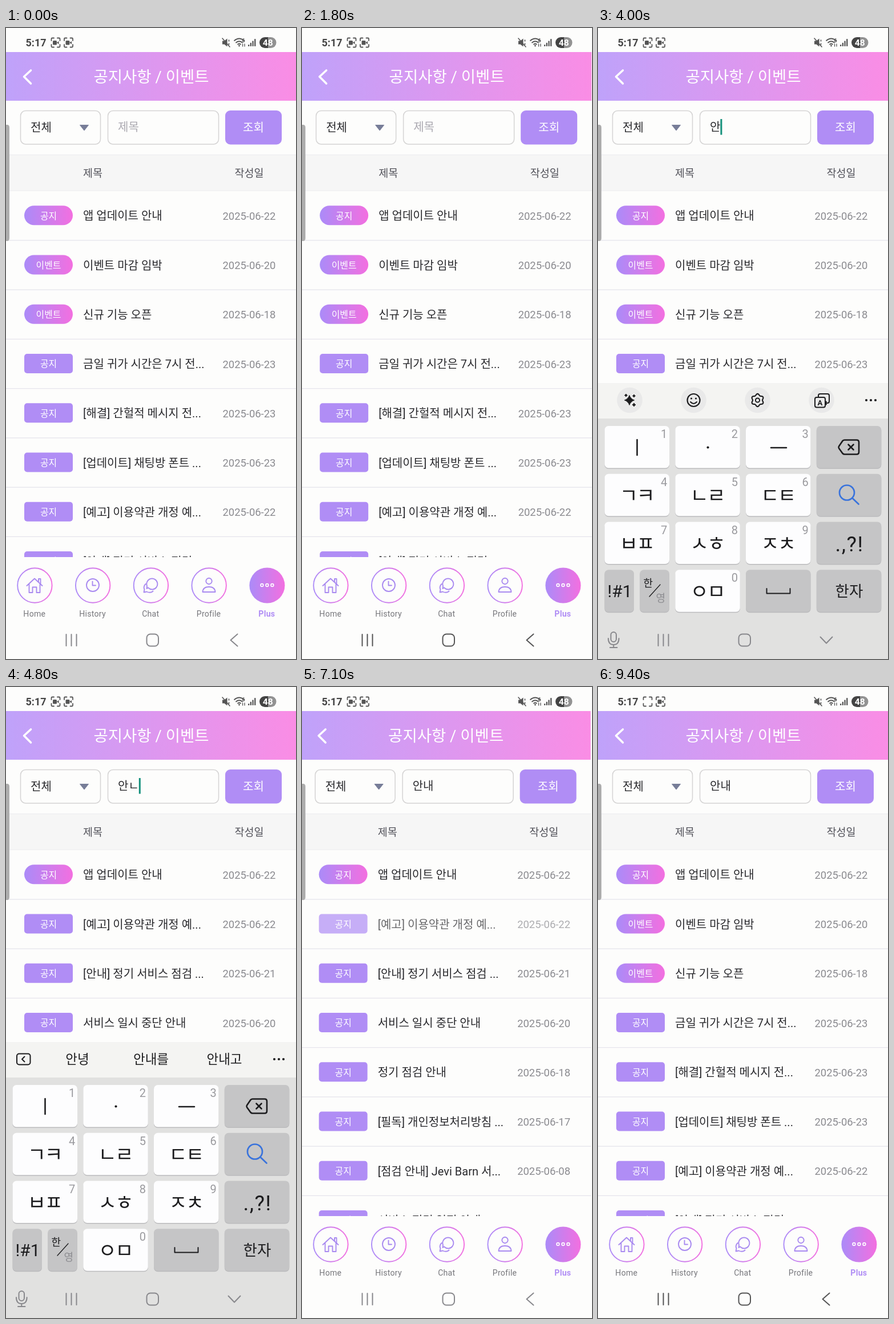
Recreate the animation shown at these times as an HTML page. Size 508 by 1102 pixels, loop 9500 ms.

```html
<!DOCTYPE html>
<html lang="ko">
<head>
<meta charset="utf-8">
<style>
html, body { margin: 0; width: 100%; height: 100%; overflow: hidden; background: #fdfdfc; }
svg { display: block; width: 508px; height: 1102px; }
text { font-family: Roboto, "Noto Sans CJK KR", "Noto Sans CJK JP", sans-serif; white-space: pre; }
.line { fill: none; stroke-linecap: round; stroke-linejoin: round; }
</style>
</head>
<body>
<svg id="stage" viewBox="0 0 508 1102" xmlns="http://www.w3.org/2000/svg"></svg>
<script>
const LOOP = 9500;
const PURPLE = '#b08df5', INK = '#28282c', PAPER = '#fdfdfc';
const KEY_INK = '#1c1c1e', WHITE_KEY = '#fdfdfe', GRAY_KEY = '#c5c5c6';

const text = (x, y, s, size, fill, extra = '') =>
  `<text x="${x}" y="${y}" font-size="${size}" fill="${fill}" ${extra}>${s}</text>`;
const mid = (x, y, s, size, fill, extra = '') =>
  text(x, y, s, size, fill, `text-anchor="middle" ${extra}`);
const rect = (x, y, w, h, r, fill, extra = '') =>
  `<rect x="${x}" y="${y}" width="${w}" height="${h}" rx="${r}" fill="${fill}" ${extra}/>`;
const line = (d, color, w = 2, extra = '') =>
  `<path class="line" d="${d}" stroke="${color}" stroke-width="${w}" ${extra}/>`;
const dot = (x, y, r, fill, extra = '') =>
  `<circle cx="${x}" cy="${y}" r="${r}" fill="${fill}" ${extra}/>`;
const group = (id, body, extra = '') => `<g id="${id}" ${extra}>${body}</g>`;

const fade = (id, ...stops) => `<linearGradient id="${id}">` +
  stops.map(([at, c]) => `<stop offset="${at}" stop-color="${c}"/>`).join('') + '</linearGradient>';

const defs = `<defs>
  ${fade('bar', [0, '#bfa2fa'], [1, '#fa8de5'])}
  ${fade('pill', [0, '#ab8bf8'], [1, '#f36fe0'])}
  ${fade('battery', [.5, '#444'], [.5, '#929292'])}
  <clipPath id="body"><rect y="42" width="508" height="882"/></clipPath>
</defs>`;

// Status bar
function recorder(x, id) {
  const corners = line(`M${x - 7.5} 22v-3q0-1.500 1.500-1.500h3M${x + 3} 17.500h3q1.500 0 1.500 1.500v3
    M${x + 7.5} 29v3q0 1.500-1.500 1.500h-3M${x - 3} 33.500h-3q-1.500 0-1.500-1.500v-3`, '#555', 1.8);
  const camera = rect(x - 5, 22, 7, 7.5, 1.5, '#555') +
    `<path d="M${x + 2} 25.500l3.500-2.500v5.500z" fill="#555"/>`;
  return corners + group(id, camera);
}
const status = rect(0, 0, 508, 42, 0, PAPER) +
  text(34.5, 32, '5:17', 18, '#444', 'font-weight="700"') +
  recorder(87, 'camA') + recorder(109.5, 'camB') +
  '<path d="M379 22.500h3.500l5-4v14l-5-4h-3.500z" fill="#555"/>' +
  line('M379 18L392 33M390.500 21v2M390.500 27v2', '#555', 1.6) +
  line('M400 22q8.500-7 17 0M403 25.500q5.500-4.500 11 0M406 28.500q2.500-2 5 0', '#555', 1.8) +
  dot(408.5, 31, 1.4, '#555') +
  text(413.5, 25, '6', 9, '#555', 'font-weight="700"') +
  line('M414.500 32v-4M418 28v4', '#555', 1.3) +
  [0, 1, 2, 3].map(i => rect(424 + i * 3.7, 29 - i * 3.3, 2.3, 3 + i * 3.3, .8, '#555')).join('') +
  rect(444, 16, 29.5, 19, 9.5, 'url(#battery)') +
  mid(458.7, 31.3, '48', 15.5, '#fff', 'font-weight="700"');

const header = rect(0, 42, 508, 85, 0, 'url(#bar)') +
  line('M43.500 74L31.500 85L43.500 97', '#fff', 3.6) +
  mid(254.5, 95, '공지사항 / 이벤트', 27.5, '#fff');

const field = (x, w) => rect(x, 144.5, w, 58.5, 9, PAPER, 'stroke="#d5d4d4" stroke-width="1.500"');
const search = field(25.5, 140) + field(178.5, 194) +
  text(43, 181.3, '전체', 20, INK) +
  '<path d="M129.500 169.500h15l-7.500 9.500z" fill="#777d98" stroke="#777d98" stroke-linejoin="round"/>' +
  text(196, 179.7, '', 20, INK, 'id="query"') +
  rect(196, 183, 38, 1.3, 0, INK, 'id="under"') +
  rect(196, 159, 3, 27.5, 0, '#15917c', 'id="caret"') +
  rect(384, 144, 99, 59.5, 9, PURPLE) +
  mid(433.5, 181.3, '조회', 20, '#fff', 'font-weight="500"');

const heads = rect(0, 221, 508, 63.5, 0, '#f6f6f6') +
  line('M0 221.500H508M0 284H508', '#ececf0', 1) +
  text(135, 260, '제목', 18.5, '#505058') + text(400.5, 260, '작성일', 18.5, '#505058');

function badge(x, cy, label, round) {
  return rect(x, cy - 17, 85, 34, round ? 17 : 5, round ? 'url(#pill)' : PURPLE) +
    mid(x + 42.5, cy + 6.2, label, 15.9, '#fff', 'font-weight="500"');
}
function row([label, round, title, day], i) {
  const cy = 327.3 + i * 86.25;
  return `<g class="row">${badge(32, cy, label, round)}
    ${text(135, cy + 8, title, 20, INK)}
    ${text(379.5, cy + 7.6, '2025-06-' + day, 18.4, '#8b8b90')}</g>` +
    line(`M0 ${cy + 43.5}H508`, '#e5e4ec', 1.2);
}

const update = ['공지', 1, '앱 업데이트 안내', 22];
const terms = ['공지', 0, '[예고] 이용약관 개정 예...', 22];
const check = ['공지', 0, '[안내] 정기 서비스 점검 ...', 21];
const everything = [
  update,
  ['이벤트', 1, '이벤트 마감 임박', 20],
  ['이벤트', 1, '신규 기능 오픈', 18],
  ['공지', 0, '금일 귀가 시간은 7시 전...', 23],
  ['공지', 0, '[해결] 간헐적 메시지 전...', 23],
  ['공지', 0, '[업데이트] 채팅방 폰트 ...', 23],
  terms, check
];
const matches = [
  update, terms, check,
  ['공지', 0, '서비스 일시 중단 안내', 20],
  ['공지', 0, '정기 점검 안내', 18],
  ['공지', 0, '[필독] 개인정보처리방침 ...', 17],
  ['공지', 0, '[점검 안내] Jevi Barn 서...', '08'],
  ['공지', 0, '서비스 점검 일정 안내', '07']
];

const listPage = rect(0, 42, 508, 882, 0, PAPER) + header + search + heads +
  group('all', everything.map(row).join('')) +
  group('found', matches.map(row).join(''));

const detail = (id, round, title, lines) => group(id,
  badge(32, 169, '공지', round) +
  text(32, 224, title, 21, INK, 'font-weight="500"') +
  text(32, 256, '2025-06-22', 18.4, '#8b8b90') +
  line('M25 280H483', '#e5e4ec', 1.2) +
  lines.map((s, i) => text(32, 320 + i * 32, s, 19, '#505058')).join(''));

const detailPage = rect(0, 42, 508, 882, 0, PAPER) + header +
  detail('news', 1, '앱 업데이트 안내',
    ['더 나은 서비스를 위해 앱이 업데이트됩니다.', '최신 버전으로 이용해 주세요.', '감사합니다.']) +
  detail('legal', 0, '[예고] 이용약관 개정 예정 안내',
    ['이용약관이 일부 개정될 예정입니다.', '변경 내용을 확인해 주세요.', '감사합니다.']);

// Bottom tabs
const tabIcons = [
  'M36.500 974L50 961.500L63.500 974M40.500 971.500V986H46.500V976.500H53.500V986H59.500V971.500M57 967V962H60.500V970.500',
  'M163 973a11 11 0 1 1-22 0a11 11 0 1 1 22 0M151.500 966.500V973.500H157',
  'M249 977.500L246.500 979L247 974.500A9.500 9.500 0 1 1 257 980.500Q252 980.500 249 977.500M244.500 971Q240 975 242.500 980.500L241.500 985.500L246.500 984.500Q253 987.500 257.500 983.500',
  'M360.700 966a5.200 5.200 0 1 1-10.400 0a5.200 5.200 0 1 1 10.400 0M344.500 985Q345 976 355.500 976T366.500 985Z'
];
const tabs = rect(0, 924, 508, 178, 0, PAPER) +
  ['Home', 'History', 'Chat', 'Profile', 'Plus'].map((name, i) => {
    const x = 50.4 + i * 101.75, on = i === 4;
    return dot(x, 973.5, on ? 31 : 30.2, on ? 'url(#pill)' : PAPER,
        on ? '' : 'stroke="url(#pill)" stroke-width="1.900"') +
      (on ? [-9, 0, 9].map(d => dot(x + d, 973, 2.4, 'none', 'stroke="#fff" stroke-width="1.600"')).join('')
          : line(tabIcons[i], '#a98af0', 1.9)) +
      mid(x - .6, 1028, name, 14.1, on ? PURPLE : '#77777c',
        `letter-spacing=".25" ${on ? 'font-weight="700"' : ''}`);
  }).join('');

// Keyboard
const colX = [11.5, 135.3, 259, 382.8], rowY = [695, 778.7, 862.5, 946.3];
const key = (x, y, w, fill) =>
  rect(x, y + 1.5, w, 73.5, 7, '#bbbbbd') + rect(x, y, w, 73.5, 7, fill);
const letterKey = (x, y, digit, s) => key(x, y, 113.5, WHITE_KEY) +
  mid(x + 104, y + 21, digit, 20, '#9a9a9e') +
  mid(x + 56, y + 50.5, s, 35, KEY_INK, 'font-weight="500" letter-spacing="-2.500"');

const jamo = ['', '', '', 'ㄱㅋ', 'ㄴㄹ', 'ㄷㅌ', 'ㅂㅍ', 'ㅅㅎ', 'ㅈㅊ'];
const keys = jamo.map((s, i) => letterKey(colX[i % 3], rowY[i / 3 | 0], i + 1, s)).join('') +
  letterKey(colX[1], rowY[3], 0, 'ㅇㅁ') +
  rowY.map(y => key(colX[3], y, 113.5, GRAY_KEY)).join('') +
  key(11.5, rowY[3], 51.5, GRAY_KEY) + key(73.3, rowY[3], 51.5, GRAY_KEY) +
  key(colX[2], rowY[3], 113.5, GRAY_KEY) +
  line('M68.500 719V746M303 733H330', KEY_INK, 2.6) +
  dot(192.5, 732.5, 2.1, KEY_INK) +
  mid(38, 993.5, '!#1', 30, KEY_INK) +
  text(79.5, 976, '한', 18, KEY_INK) + text(101.5, 1001.5, '영', 18, '#8c8c90') +
  line('M90 993L109 972', KEY_INK, 1.3) +
  line('M295.500 979V987.500H336.500V979', KEY_INK, 2) +
  mid(440, 992.5, '한자', 26.5, KEY_INK) +
  mid(440.5, 914, '.,?!', 37, KEY_INK, 'letter-spacing="1.500"') +
  line('M432 719.500H453Q457 719.500 457 723.500V740.500Q457 744.500 453 744.500H432Q430 744.500 428.500 743L422 734Q421 732 422 730.500L428.500 721Q430 719.500 432 719.500ZM438.500 727.500L447.500 736.500M447.500 727.500L438.500 736.500', KEY_INK, 2.6) +
  line('M449 811.500a13 13 0 1 1-26 0a13 13 0 1 1 26 0M445.500 821L456.500 831.500', '#3973dc', 2.7);

const gear = Array.from({ length: 72 }, (_, i) => {
  const a = i * Math.PI / 36, r = 9.8 + 1.3 * Math.cos(a * 6);
  return (i ? 'L' : 'M') + (279.5 + r * Math.sin(a)).toFixed(1) + ' ' + (650 - r * Math.cos(a)).toFixed(1);
}).join('') + 'Z';
function spark(x, y, r) {
  const k = r * .25;
  return `<path d="M${x} ${y - r}Q${x + k} ${y - k} ${x + r} ${y}Q${x + k} ${y + k} ${x} ${y + r}
    Q${x - k} ${y + k} ${x - r} ${y}Q${x - k} ${y - k} ${x} ${y - r}Z"
    fill="${KEY_INK}" stroke="${KEY_INK}" stroke-linejoin="round"/>`;
}

const tools = [55.5, 167.5, 279.5, 391.5].map(x => dot(x, 650, 22.3, '#e9e9e9')).join('') +
  spark(55, 650, 8.5) + spark(49, 641.5, 2.5) + spark(63, 642.5, 2.5) + spark(63, 658, 3) +
  dot(167.5, 650, 11, 'none', `stroke="${KEY_INK}" stroke-width="2.200"`) +
  dot(163.5, 647, 1.6, KEY_INK) + dot(171.5, 647, 1.6, KEY_INK) +
  line('M162 653Q167.500 659 173 653', KEY_INK, 2) +
  line(gear, KEY_INK, 2.1) + dot(279.5, 650, 3.6, 'none', `stroke="${KEY_INK}" stroke-width="2"`) +
  line('M386 644V642Q386 639 389 639H402Q405 639 405 642V652Q405 655 402 655H400M400 652.500L397.500 655L400 657.500', KEY_INK, 2) +
  rect(380, 645, 18, 17.5, 3, '#e9e9e9', `stroke="${KEY_INK}" stroke-width="2"`) +
  mid(389, 658.5, 'A', 13, KEY_INK, 'font-weight="700"');

const hints = rect(19, 640.5, 23.5, 19, 4, 'none', `stroke="${KEY_INK}" stroke-width="2"`) +
  line('M32.500 645.500L28 650L32.500 654.500', KEY_INK, 2) +
  mid(125, 658.3, '안녕', 22.5, KEY_INK) + mid(254, 658.3, '안내를', 22.5, KEY_INK) +
  mid(382.5, 658.3, '안내고', 22.5, KEY_INK);

const keyboard = rect(0, 620, 508, 62, 0, '#f4f4f2') + rect(0, 682, 508, 430, 0, '#e1e1e0') +
  group('tools', tools) + group('hints', hints) +
  [470, 478, 486].map(x => dot(x, 650, 2.1, KEY_INK)).join('') + keys;

const system = group('system',
  '<path d="M105.500 1059v20M114.500 1059v20M123.500 1059v20"/>' +
  '<rect x="246.500" y="1058.500" width="20.500" height="21" rx="6.500"/>' +
  '<path id="back" d="M405.500 1058.500L393.500 1069L405.500 1079.500"/>' +
  '<path id="down" d="M389.500 1063.500L400 1074.500L410.500 1063.500"/>' +
  group('mic', '<rect x="22.500" y="1055" width="9.500" height="17" rx="4.700"/><path d="M18 1066q0 11 9.300 11t9.300-11M27.300 1077v5M21 1082h12.500"/>'),
  'class="line" stroke-width="2"');

const stage = document.getElementById('stage');
stage.innerHTML = defs + rect(0, 0, 508, 1102, 0, PAPER) +
  `<g clip-path="url(#body)">${group('list', listPage)}${group('detail', detailPage)}</g>` +
  tabs + status +
  '<path d="M0 169H2Q6 169 6 174V367Q6 372 2 372H0Z" fill="#adadad"/>' +
  group('keyboard', keyboard) + system;

const el = {};
stage.querySelectorAll('[id]').forEach(n => el[n.id] = n);
const show = (n, on) => n.style.display = on ? '' : 'none';
const within = (t, a, b) => t >= a && t < b;
const clamp = v => Math.max(0, Math.min(1, v));

// Fast start, very long settle: two joined cubic curves
const bez = (a, b, c, d, s) => {
  const u = 1 - s;
  return u * u * u * a + 3 * u * u * s * b + 3 * u * s * s * c + s * s * s * d;
};
function ease(p) {
  if (p <= 0) return 0;
  if (p >= 1) return 1;
  const first = p < 1 / 6;
  const x = first ? [0, .05, .133333, 1 / 6] : [1 / 6, .208333, .25, 1];
  const y = first ? [0, 0, .06, .4] : [.4, .82, 1, 1];
  let lo = 0, hi = 1;
  for (let i = 0; i < 24; i++) {
    const m = (lo + hi) / 2;
    if (bez(...x, m) < p) lo = m; else hi = m;
  }
  return bez(...y, lo);
}

function track(points, t) {
  let [t0, v0] = points[0];
  for (const [t1, v1] of points) {
    if (t < t1) return v0 + (v1 - v0) * clamp((t - t0) / (t1 - t0));
    t0 = t1; v0 = v1;
  }
  return v0;
}

const SLIDE = 450, SHIFT = 50.8;
const visits = [{ open: 168, close: 1500 }, { open: 7068, close: 8700 }];
const keyDrop = [[2750, 482], [2850, 250], [2900, 125], [3000, 35], [3100, 9], [3200, 0],
  [6300, 0], [6400, 150], [6500, 360], [6600, 482]];
const typed = [[0, ''], [3700, 'ㅇ'], [3800, '이'], [3900, '아'], [3980, '안'],
  [4700, '안ㄴ'], [4900, '안니'], [5100, '안나'], [5300, '안내']];

function slide(t) {
  const v = visits.find(v => within(t, v.open, v.close + SLIDE));
  let x = 0, dx = 0, alpha = 0;
  if (v && t < v.close) {
    const e = ease((t - v.open) / SLIDE);
    x = -SHIFT * e;
    dx = SHIFT * (1 - e);
    alpha = clamp((t - v.open - 50) / 83);
  } else if (v) {
    const e = ease((t - v.close) / SLIDE);
    x = -SHIFT * (1 - e);
    dx = SHIFT * e;
    alpha = 1 - clamp((t - v.close - 35) / 83);
  }
  el.list.setAttribute('transform', `translate(${x.toFixed(2)} 0)`);
  el.detail.setAttribute('transform', `translate(${dx.toFixed(2)} 0)`);
  el.detail.setAttribute('opacity', alpha);
  show(el.news, t < 5000);
  show(el.legal, t >= 5000);
}

function input(t) {
  const word = typed.filter(([at]) => t >= at).pop()[1];
  el.query.textContent = word || '제목';
  el.query.setAttribute('fill', word ? INK : '#aaa8b0');
  el.caret.setAttribute('x', 196 + word.length * 18.4);
  show(el.caret, within(t, 2700, 6000));
  show(el.under, within(t, 5300, 6300));
}

function draw(t) {
  slide(t);
  input(t);

  const filtered = within(t, 4500, 9400);
  show(el.all, !filtered);
  show(el.found, filtered);
  el.all.querySelector('.row').setAttribute('opacity', within(t, 90, 300) ? .7 : 1);
  el.found.querySelectorAll('.row')[1].setAttribute('opacity', within(t, 7000, 7300) ? .7 : 1);

  const drop = track(keyDrop, t);
  const open = drop < 482;
  show(el.keyboard, open);
  el.keyboard.setAttribute('transform', `translate(0 ${drop.toFixed(2)})`);
  show(el.tools, t < 4300);
  show(el.hints, t >= 4300);

  const dark = within(t, 1200, 3300) || t >= 8500;
  el.system.setAttribute('stroke', dark ? '#555' : '#88888c');
  show(el.back, !open);
  show(el.down, open);
  show(el.mic, open);
  show(el.camA, !within(t, 5500, 5800) && t < 9000);
}

const start = performance.now();
function tick() {
  draw((performance.now() - start) % LOOP);
  requestAnimationFrame(tick);
}
tick();
</script>
</body>
</html>
```
